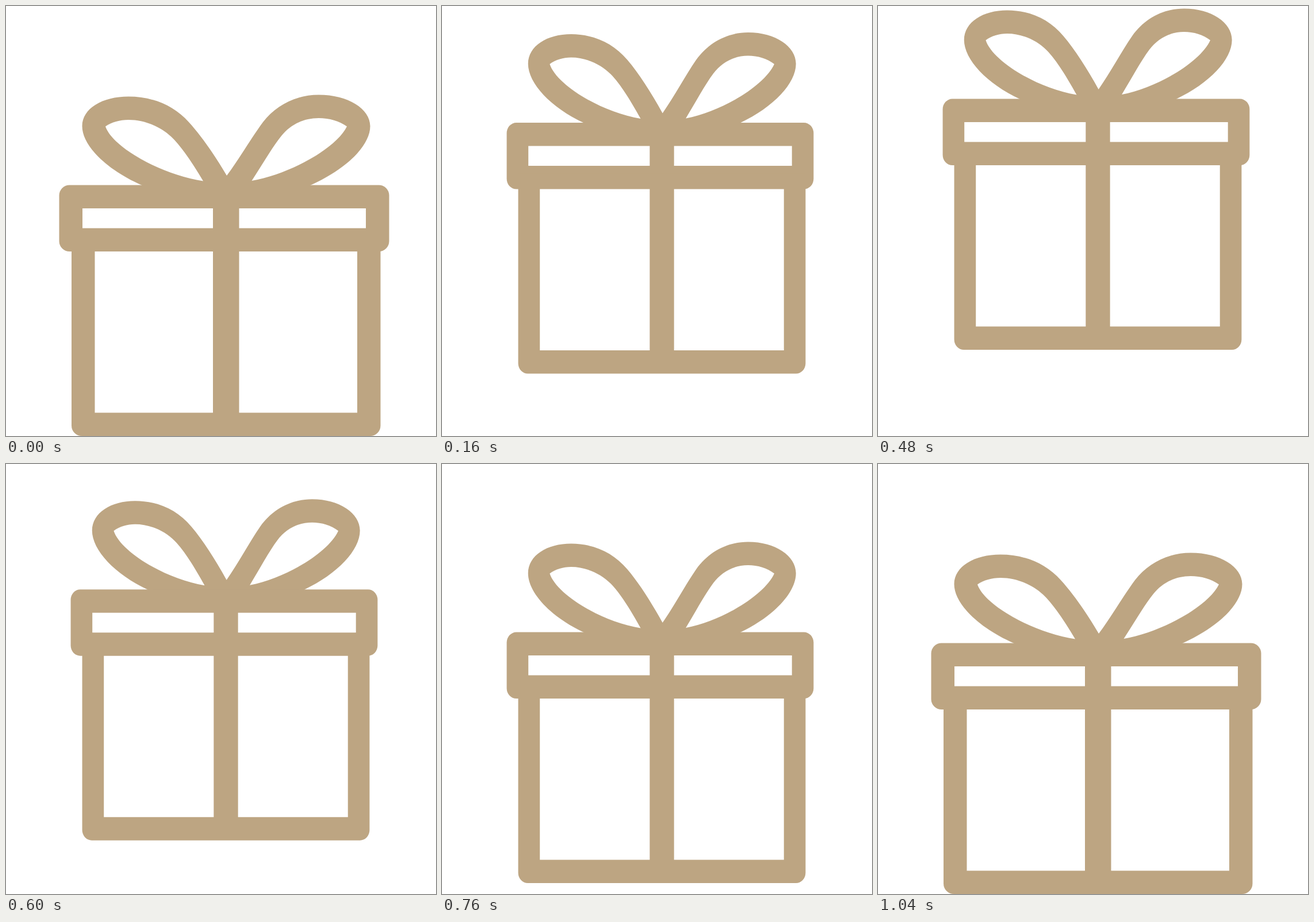
An HTML page that plays this animation: 748x748 px, repeating every 2000 ms.

```html
<!DOCTYPE html>
<html lang="en">
<head>
<meta charset="utf-8">
<title>Gift</title>
<style>
  html, body { margin: 0; width: 100%; height: 100%; overflow: hidden; background: #fff; }
  svg { display: block; width: 100%; height: 100%; }
  .band { fill: #bda582; }
  .gap { fill: #fff; }
</style>
</head>
<body>
<svg viewBox="0 0 748 748">
  <g id="gift">
    <g class="band">
      <path d="M237 312C175 285 132.5 243 132.5 209C132.5 178 168 157.5 213 157.5C255 157.5 292 173 318 202C340 226 362 258 384 295
        C405 267 427 229 447 202C470 172 505 154.5 544 154.5C595 154.5 633.5 179 633.5 209C633.5 243 592 284 529 312V320H237Z"/>
      <rect x="92.5" y="311.5" width="574" height="115.5" rx="18"/>
      <path d="M114 400H651.5V730A18 18 0 0 1 633.5 748H132A18 18 0 0 1 114 730Z"/>
    </g>
    <g class="gap">
      <path d="M173 209.5C184 202 198 198 213 198C240 198 268 209 287 227C305 244 325 274 343 304.5C268 293 185 245 173 209.5Z"/>
      <path d="M593 209.5C580 200 562 195 544 195C518 195 495 206 479 226C463 246 447 274 427.5 304C495 292 575 247 593 209.5Z"/>
      <path d="M133 352H360V386.5H133ZM405.5 352H626V386.5H405.5Z"/>
      <path d="M154.5 427H360V707.5H154.5ZM405.5 427H611V707.5H405.5Z"/>
    </g>
  </g>
</svg>
<script>
  const gift = document.getElementById('gift');
  const LOOP = 2000, STEP = 40, LEAD = 4;
  const CENTER = 379, SQUEEZE = 0.93;
  const start = performance.now();

  // Fast leap that eases out at the top, then an eased drop.
  function lift(t) {
    if (t < 600) return 155.4 * (1 - Math.exp(-(t + 17) / 148));
    return 94.3 * Math.exp((600 - t) / 103) - 1;
  }

  function draw() {
    const time = (performance.now() - start + LEAD) % LOOP;
    const t = Math.floor(time / STEP) * STEP;
    const jumping = t >= 40 && t < 1040;
    const y = jumping ? -lift(t) : 0;
    const sx = jumping ? SQUEEZE : 1;
    gift.setAttribute('transform', `translate(${CENTER * (1 - sx)} ${y}) scale(${sx} 1)`);
    requestAnimationFrame(draw);
  }
  draw();
</script>
</body>
</html>
```
